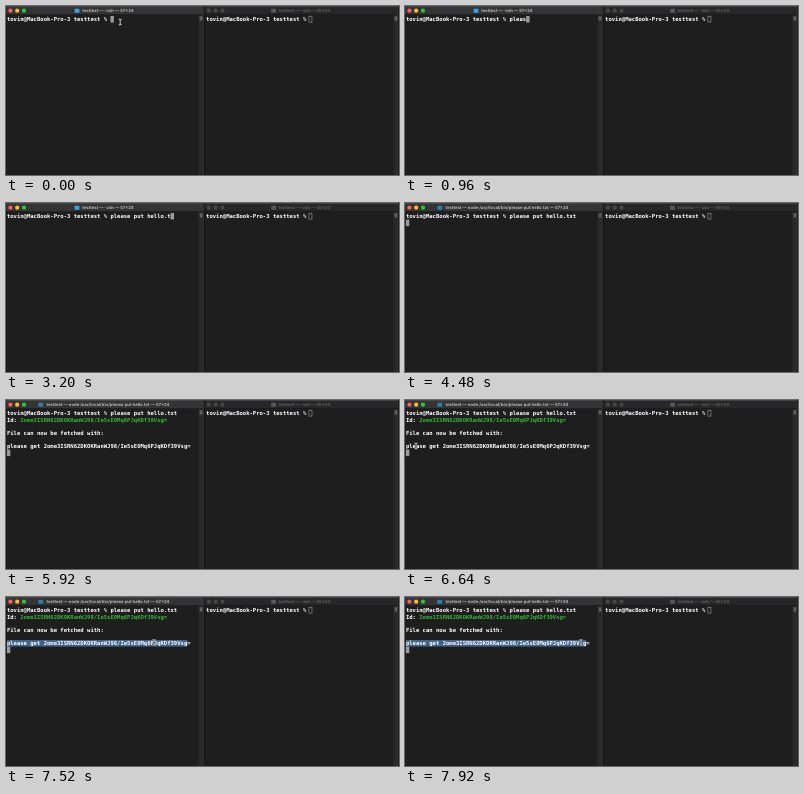
Write an HTML page that moves like this. It is 393 px wide and 169 px high and loops after 8 s.

```html
<!DOCTYPE html>
<html lang="en">
<head>
<meta charset="utf-8">
<title>Two terminals</title>
<style>
  html, body { margin: 0; width: 100%; height: 100%; overflow: hidden; background: #1e1e1e; }
  svg { display: block; width: 393px; height: 169px; }
  text { white-space: pre; text-rendering: geometricPrecision; }
  .mono { font: 700 5.55px "DejaVu Sans Mono", monospace; fill: #fff; }
  .title { font: 700 4.25px Inter, sans-serif; fill: #b8b8b8; text-anchor: middle; }
  .dim { fill: #5f5f5f; }
  .green { fill: #35b534; }
</style>
</head>
<body>
<svg id="stage" viewBox="0 0 393 169"></svg>
<script>
const LOOP = 8000, TICK = 80;
const CELL = 3.341, LINE = 6.6, LEFT = 0.9, RIGHT = 200.1;
const PROMPT = "tovin@MacBook-Pro-3 testtest % ";
const COMMAND = "please put hello.txt";
const HASH = "2ome3ISRN62DKOKRanWJ98/Ie5sE0Mq6PJqKDf39Vsg=";

// [time, characters typed]
const TYPING = [
  [0, 0], [480, 1], [560, 2], [640, 3], [720, 4], [960, 5], [1040, 7], [1120, 8],
  [1440, 9], [1520, 10], [1600, 11], [1840, 12], [1920, 13], [2000, 14],
  [2160, 15], [2320, 16], [3040, 17], [3200, 18], [3440, 19], [3760, 20]
];
// [time, characters selected]; the drag extends word by word
const SELECTION = [[0, 0], [7040, 6], [7200, 10], [7280, 54]];
// [time, x, y]
const POINTER = [
  [6000, 108, 24], [6240, 40, 53], [6400, 15, 49], [6560, 11, 46], [7120, 11, 46],
  [7280, 48, 46], [7520, 148, 45.5], [7920, 176, 45.5]
];
const ENTER = 4000, BUSY = 4080, OUTPUT = 5440;

const stage = document.getElementById("stage");

function add(tag, attrs, parent = stage) {
  const el = document.createElementNS("http://www.w3.org/2000/svg", tag);
  for (const key in attrs) el.setAttribute(key, attrs[key]);
  return parent.appendChild(el);
}
function rect(x, y, width, height, fill, extra) {
  return add("rect", { x, y, width, height, fill, ...extra });
}
function label(x, y, cls, str, parent) {
  const el = add("text", { x, y, class: cls }, parent);
  el.textContent = str;
  return el;
}
const rowY = row => 15 + row * LINE;
const show = (el, on) => el.setAttribute("visibility", on ? "visible" : "hidden");
const stepAt = (table, t) => table.filter(row => row[0] <= t).pop()[1];

function windowFrame(x, width, bar, lights) {
  const right = x + width;
  rect(x, 0, width, 169, "#1e1e1e");
  rect(right - 5, 9, 5, 160, "#292929");
  rect(x, 0, width, 8.8, bar);
  rect(x, 0, width, 0.6, "#555");
  rect(x, 8.5, width, 0.6, "#141414");
  rect(right - 0.5, 0, 0.5, 169, "#484848");
  lights.forEach((fill, i) => add("circle", { cx: x + 4.4 + i * 6.8, cy: 4.7, r: 2.1, fill }));
  rect(right - 3.9, 10, 3.2, 4.8, "#4c4c4c");
  rect(right - 3, 10.8, 1.4, 3.2, "#6a6a6a");
}

rect(0, 0, 393, 169, "#0c0c0c");
windowFrame(0, 197.4, "#343335", ["#fe5f57", "#febc2e", "#28c840"]);
windowFrame(198.5, 193.7, "#272628", Array(3).fill("#484748"));

const icon = rect(68.6, 2.8, 4.8, 4, "#35a7e8", { rx: 0.6 });
const title = label(102, 6.2, "title", "");
rect(265.2, 2.8, 4.8, 4, "#505a60", { rx: 0.6 });
label(298.3, 6.2, "title dim", "testtest — -zsh — 55×24");

const highlight = rect(LEFT, rowY(5) - 5, 0, LINE, "#3f638b");
const block = rect(0, 0, 3.4, 6.5, "#9b9b9b");
const command = label(LEFT, rowY(0), "mono", "");
label(RIGHT, rowY(0), "mono", PROMPT);
rect(RIGHT + PROMPT.length * CELL - 0.7, 10.2, 3, 5.9, "none", { stroke: "#9b9b9b", "stroke-width": 0.6 });

const output = add("g", {});
label(LEFT, rowY(1), "mono", "Id:", output);
label(LEFT + 4 * CELL, rowY(1), "mono green", HASH, output);
label(LEFT, rowY(3), "mono", "File can now be fetched with:", output);
label(LEFT, rowY(5), "mono", "please get " + HASH, output);

const pointer = add("g", {});
const beam = "M-1.5-2.9Q0-2.9 0-2Q0-2.9 1.5-2.9M0-2.2V2.2M-1.5 2.9Q0 2.9 0 2Q0 2.9 1.5 2.9";
for (const [stroke, w] of [["#222", 1.5], ["#eee", 0.8]])
  add("path", { d: beam, fill: "none", stroke, "stroke-width": w }, pointer);

function pointerAt(t) {
  if (t < 480) return [114.2, 16];
  if (t < POINTER[0][0]) return null;
  const i = POINTER.findIndex(p => p[0] > t);
  if (i < 0) return POINTER[POINTER.length - 1].slice(1);
  const a = POINTER[i - 1], b = POINTER[i];
  const k = (t - a[0]) / (b[0] - a[0]);
  return [1, 2].map(n => a[n] + (b[n] - a[n]) * k);
}

function draw(t) {
  const typed = stepAt(TYPING, t);
  command.textContent = PROMPT + COMMAND.slice(0, typed);

  const busy = t >= BUSY;
  title.textContent = busy
    ? "testtest — node /usr/local/bin/please put hello.txt — 57×24"
    : "testtest — -zsh — 57×24";
  icon.setAttribute("x", busy ? 32.3 : 68.6);
  icon.setAttribute("fill", busy ? "#2b7fa8" : "#35a7e8");

  const row = t < ENTER ? 0 : t < OUTPUT ? 1 : 6;
  const col = row ? 0 : PROMPT.length + typed;
  block.setAttribute("x", LEFT + col * CELL);
  block.setAttribute("y", rowY(row) - 5);

  show(output, t >= OUTPUT);
  highlight.setAttribute("width", stepAt(SELECTION, t) * CELL);

  const at = pointerAt(t);
  show(pointer, at);
  if (at) pointer.setAttribute("transform", `translate(${at})`);
}

const start = performance.now();
function loop() {
  const t = (performance.now() - start) % LOOP;
  draw(Math.floor(t / TICK) * TICK);
  requestAnimationFrame(loop);
}
draw(0);
requestAnimationFrame(loop);
</script>
</body>
</html>
```
